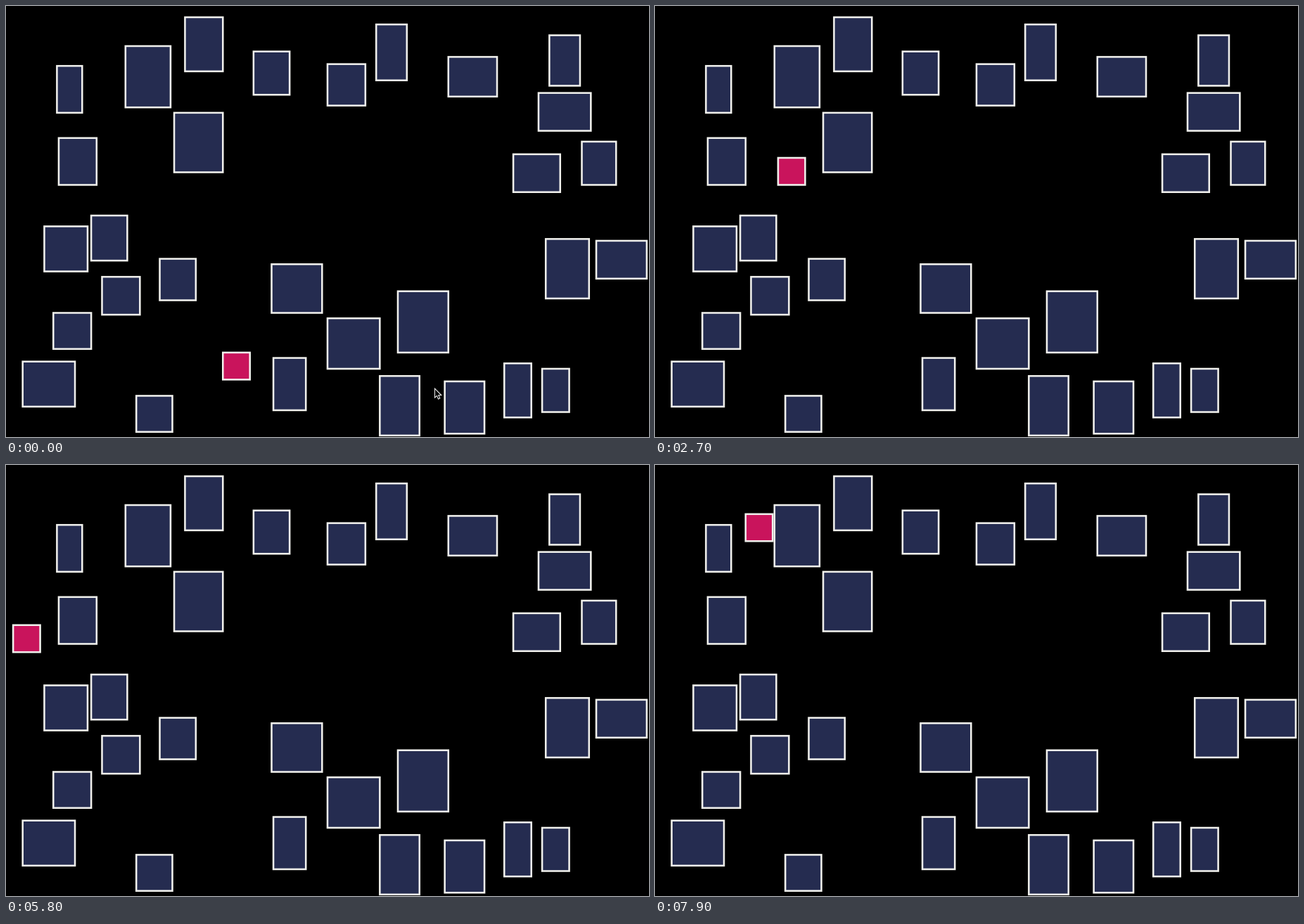
An HTML page with a canvas that plays this animation: 914x613 px, repeating every 8 s.

```html
<!DOCTYPE html>
<html>
<head>
<meta charset="utf-8">
<style>
html, body { margin: 0; width: 100%; height: 100%; overflow: hidden; background: #000; }
canvas { display: block; }
</style>
</head>
<body>
<canvas id="stage" width="914" height="613"></canvas>
<script>
const ctx = document.getElementById('stage').getContext('2d');
const LOOP = 8, FPS = 10;
const UNIT = 2.564, OFFSET = -0.68;   // the scene lies on a grid of whole units
const PLAYER = 16;

// x, y, width, height in units
const walls = [
  [28, 33, 15, 27], [66, 22, 26, 35], [99, 6, 22, 31], [137, 25, 21, 25], [178, 32, 22, 24],
  [205, 10, 18, 32], [245, 28, 28, 23], [301, 16, 18, 29], [295, 48, 30, 22], [281, 82, 27, 22],
  [319, 75, 20, 25], [29, 73, 22, 27], [93, 59, 28, 34], [21, 122, 25, 26], [47, 116, 21, 26],
  [53, 150, 22, 22], [85, 140, 21, 24], [26, 170, 22, 21], [9, 197, 30, 26], [72, 216, 21, 21],
  [147, 143, 29, 28], [178, 173, 30, 29], [217, 158, 29, 35], [148, 195, 19, 30], [207, 205, 23, 34],
  [243, 208, 23, 30], [276, 198, 16, 31], [297, 201, 16, 25], [299, 129, 25, 34], [327, 130, 29, 22]
];

// Turning points: seconds, x, y in units
const path = [
  [0, 120, 192], [0.7, 120, 192], [1.7, 116, 112], [2.4, 74, 94], [2.7, 68, 84],
  [3.3, 77, 61], [3.6, 77, 61], [4.3, 58, 100], [4.9, 18, 100], [5.2, 0, 100], [5.6, 0, 100],
  [6.3, 13, 60], [6.4, 13, 60], [6.7, 9, 60], [6.9, 2, 48], [7.3, 9, 14], [7.7, 50, 14],
  [7.9, 50, 27], [LOOP, 50, 27]
];

function playerAt(t) {
  const i = path.findIndex(p => p[0] > t);
  const [t0, x0, y0] = path[i - 1], [t1, x1, y1] = path[i];
  const k = (t - t0) / (t1 - t0);
  return [x0 + (x1 - x0) * k, y0 + (y1 - y0) * k];
}

function box(x, y, w, h, fill) {
  ctx.fillStyle = '#f0f0ec';
  ctx.fillRect(x, y, w, h);
  ctx.fillStyle = fill;
  ctx.fillRect(x + 1, y + 1, w - 2, h - 2);
}

function drawCursor(x, y) {
  ctx.setTransform(1, 0, 0, 1, x, y);
  const arrow = new Path2D('M0 0V13L3 10.3L5 15L7.3 14L5.3 9.5H9.3Z');
  ctx.fillStyle = '#000';
  ctx.fill(arrow);
  ctx.strokeStyle = '#e8e8e8';
  ctx.lineWidth = 1.1;
  ctx.stroke(arrow);
}

function draw(seconds) {
  const t = Math.floor(seconds % LOOP * FPS) / FPS;
  ctx.setTransform(1, 0, 0, 1, 0, 0);
  ctx.clearRect(0, 0, 914, 613);
  ctx.setTransform(UNIT, 0, 0, UNIT, OFFSET, OFFSET);
  for (const wall of walls) box(...wall, '#252c50');
  box(...playerAt(t), PLAYER, PLAYER, '#c9145c');
  if (t < 0.6) drawCursor(609.5 + 25 * t, 544 + 120 * t);
}

let start;
function frame(now) {
  start ??= now;
  draw((now - start) / 1000);
  requestAnimationFrame(frame);
}
draw(0);
requestAnimationFrame(frame);
</script>
</body>
</html>
```
